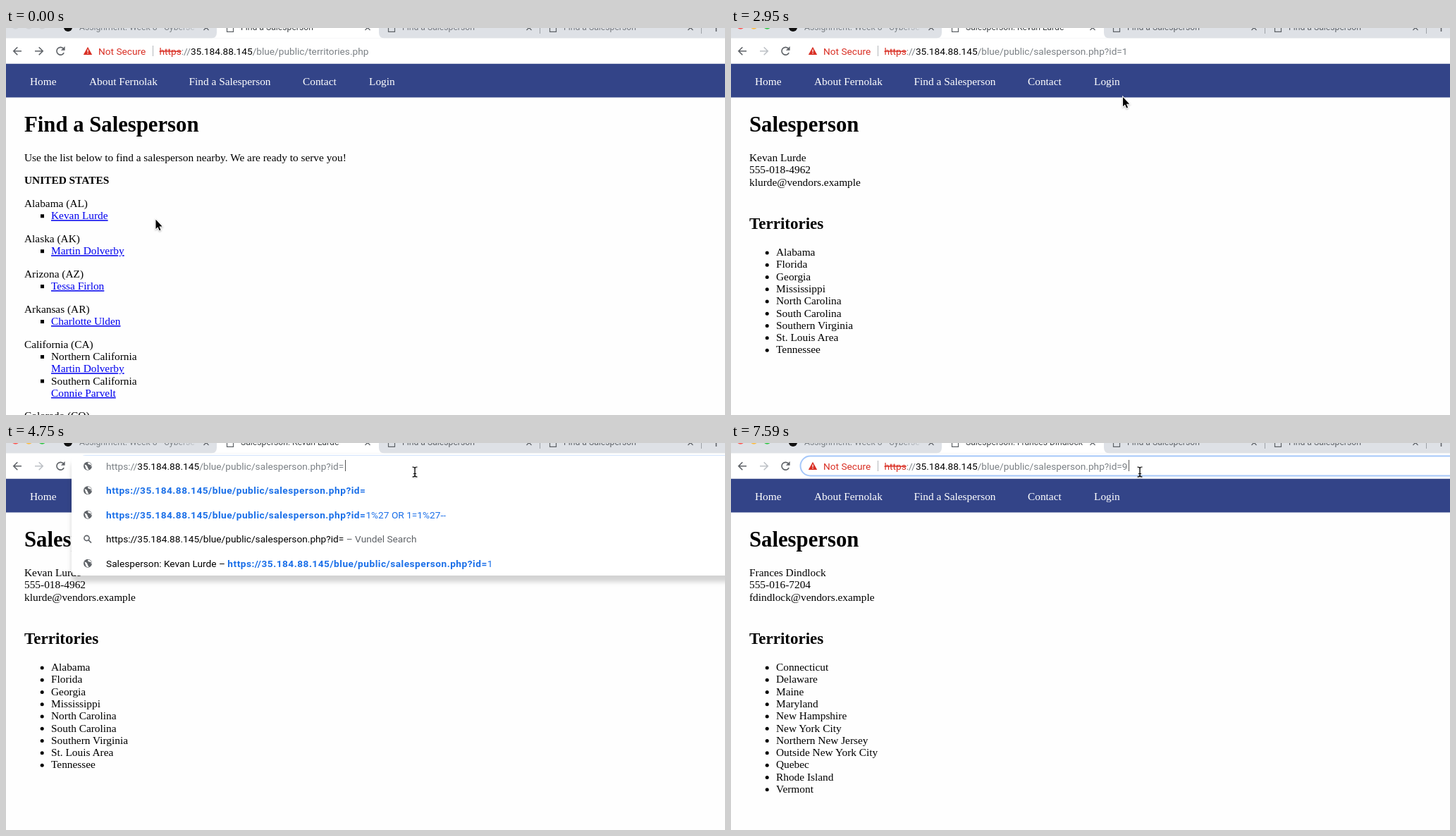
Animation of 1020 by 549 pixels, one loop 8 s. Source, as an HTML page:

```html
<!DOCTYPE html>
<html lang="en">
<head>
<meta charset="utf-8">
<title>Find a Salesperson</title>
<style>
  html, body { margin: 0; width: 100%; height: 100%; overflow: hidden; background: #fefefe; }
  svg { display: block; width: 1020px; height: 549px; }
  text { white-space: pre; }
  .page { font: 15.36px "Liberation Serif", serif; }
  .h1 { font-size: 30.72px; font-weight: bold; }
  .h2 { font-size: 23.04px; font-weight: bold; }
  .b { font-weight: bold; }
  .link { fill: #00e; text-decoration: underline; }
  .nav { fill: #fff; }
  .tab { font: 12.2px Roboto, sans-serif; }
  .url { font: 13.7px Roboto, sans-serif; }
  .hit { fill: #1a6fe8; }
  .hit .b { letter-spacing: .5px; }
  .gray { fill: #7b8085; }
  .note { fill: #5f6368; }
  .red { fill: #d93025; }
  .strike { text-decoration: line-through; }
  .line { fill: none; stroke: #5f6368; stroke-width: 1.6; }
  .panel { fill: #fff; filter: drop-shadow(0 9px 3px rgba(0, 0, 0, .17)); }
  #cursor { filter: drop-shadow(0 1px 1px rgba(0, 0, 0, .3)); }
</style>
</head>
<body>
<svg viewBox="0 0 1020 549"><g id="screen"></g><g id="cursor"></g></svg>
<script>
const LOOP = 8000, STEP = 147.6, LINE = 17.28;
const HOST = '35.184.88.145', PERSON_PATH = '/blue/public/salesperson.php?id=';

const people = {
  1: { name: 'Kevan Lurde', phone: '555-018-4962', mail: 'klurde@vendors.example',
    areas: 'Alabama,Florida,Georgia,Mississippi,North Carolina,South Carolina,Southern Virginia,St. Louis Area,Tennessee' },
  9: { name: 'Frances Dindlock', phone: '555-016-7204', mail: 'fdindlock@vendors.example',
    areas: 'Connecticut,Delaware,Maine,Maryland,New Hampshire,New York City,Northern New Jersey,Outside New York City,Quebec,Rhode Island,Vermont' }
};
const states = [
  ['Alabama (AL)', 'Kevan Lurde'], ['Alaska (AK)', 'Martin Dolverby'],
  ['Arizona (AZ)', 'Tessa Firlon'], ['Arkansas (AR)', 'Charlotte Ulden']
];

// Each entry changes part of the browser state at its time.
const timeline = [
  [0, { active: false, page: 0, id: 0, loading: false, focus: false, selected: false, caret: false, menu: 0 }],
  [885, { active: true }],
  [1765, { loading: true }],
  [2065, { page: 1, id: 1, loading: false }],
  [3240, { focus: true }],
  [3390, { selected: true }],
  [3850, { selected: false, caret: true }],
  [4300, { caret: false }],
  [4600, { menu: 4, id: '', caret: true }],
  [5040, { menu: 2, id: 9 }],
  [5490, { caret: false }],
  [5635, { menu: 0, focus: false, loading: true }],
  [5785, { page: 9, loading: false }],
  [6990, { focus: true }],
  [7140, { selected: true }],
  [7590, { selected: false, caret: true }]
];
// Pointer stops: step, x, y
const stops = [[0, 212, 271], [8, 136, 265], [10, 136, 265], [13, 166, 265], [18, 547, 117], [21, 580, 41]];

const text = (x, y, str, cls = '') => `<text x="${x}" y="${y}" class="${cls}">${str}</text>`;
const span = (cls, str) => `<tspan class="${cls}">${str}</tspan>`;
const rect = (x, y, w, h, fill, extra = '') => `<rect x="${x}" y="${y}" width="${w}" height="${h}" fill="${fill}" ${extra}/>`;
const line = (d, extra = '') => `<path class="line" d="${d}" ${extra}/>`;
const circle = (x, y, r, fill) => `<circle cx="${x}" cy="${y}" r="${r}" fill="${fill}"/>`;
const caret = x => rect(x, 24, 1, 16, '#555');

function tabs(s) {
  const lights = s.active ? ['#fc5b57', '#fdbc40', '#34c84a'] : Array(3).fill('#d0d2d6');
  const titles = [s.page ? 'Salesperson: ' + people[s.page].name : 'Find a Salesperson', 'Find a Salesperson', 'Find a Salesperson'];
  const ink = s.active ? '#5f6368' : '#777a7f';
  let out = rect(0, 0, 1020, 14.5, '#dee1e6')
    + '<path d="M291 14.5q8 0 8-8V0H529V6.5q0 8 8 8z" fill="#fff"/>'
    + lights.map((c, i) => circle(13.5 + 18.9 * i, -4, 5.8, c)).join('')
    + circle(88, -1, 6, '#111')
    + `<g class="tab">` + text(104, 3.3, 'Assignment: Week 8 - Cyberse', 'gray')
    + rect(240, 0, 36, 8, 'url(#fade)');
  titles.forEach((title, i) => {
    const x = 313 + 229 * i;
    out += i === 0 && s.loading ? circle(312, 0, 1, '#888')
      : line(`M${x + .5} -5V5.3H${x + 9.5}V-5`, 'style="stroke-width:1.2"');
    out += `<g fill="${i ? ink : '#3c4043'}">${text(x + 20, 3.3, title)}</g>`;
  });
  out += '</g>';
  for (let x = 284; x < 1000; x += 229) out += line(`M${x - 3.5} -4l7 7m0 -7l-7 7`, 'style="stroke-width:1.3"');
  return out + line('M757.5 0V8M986.5 0V8', 'style="stroke:#9da1a6;stroke-width:1"')
    + line('M1007.5 0V5');
}

function address(s) {
  const path = s.page || s.id ? PERSON_PATH + s.id : '/blue/public/territories.php';
  const forward = s.page ? 'style="stroke:#bdc1c6"' : '';
  let out = rect(0, 14, 1020, 36.5, '#fff')
    + line('M22 32.8H11M16.3 27.3L10.8 32.8L16.3 38.3')
    + line('M41 32.8H52M46.7 27.3L52.2 32.8L46.7 38.3', forward)
    + (s.loading ? line('M72.3 27.8l10 10m0 -10l-10 10')
      : line('M82.2 35.2A5.4 5.4 0 1 1 81.2 28.9') + '<path d="M83.6 26v5.7h-5.7z" fill="#5f6368"/>');
  if (s.focus) out += rect(98.5, 18.5, 960, 28, '#fff', 'rx="14" stroke="#a6c8fa" stroke-width="2"');
  if (s.selected) out += rect(217.5, 24, 345, 17, '#a9cdf8');
  const [scheme, dim] = s.selected ? ['strike', ''] : ['red strike', 'gray'];
  return out + '<path d="M116 26.8L122.2 38H109.8z" fill="#d93025"/>'
    + rect(115.4, 30.5, 1.3, 3.6, '#fff') + rect(115.4, 35, 1.3, 1.3, '#fff')
    + `<g class="url">` + text(131, 37.6, 'Not Secure', 'red') + rect(208, 25, 1, 15, '#b5b8bc')
    + text(217.5, 37.6, span(scheme, 'https') + span(dim, '://') + HOST + span(dim, path)) + '</g>'
    + (s.caret ? caret(564) : '');
}

function menu(s) {
  const base = `https://${HOST}${PERSON_PATH}`, url = base + s.id;
  const search = [url + span('note', ' – Vundel Search'), ''];
  const rows = [[span('b', url), 'hit']];
  if (s.menu === 4) rows.push([span('b', base) + '1%27 OR 1=1%27--', 'hit']);
  rows.push(search);
  if (s.menu === 4) rows.push([`Salesperson: ${people[1].name} – ` + span('hit', span('b', base) + 1), '']);
  const globe = y => circle(116, y, 6, '#5f6368')
    + `<path d="M111.5 ${y - 2}q3 0 4 3t2 4q-2 1 -4 -1zM116 ${y - 5}q0 3 3 3t1 3l2 -1q-1 -4 -4 -5z" fill="#fff"/>`;
  const bottom = s.menu === 4 ? 188 : 119;
  let out = `<path class="panel" d="M101 18H1040V${bottom}H101q-8 0 -8 -8V26q0 -8 8 -8z"/><g class="url">`
    + globe(32.8) + text(142, 37.6, span('gray', 'https://') + HOST + span('gray', PERSON_PATH + s.id));
  rows.forEach(([str, cls], i) => {
    const y = 67.2 + 34.5 * i;
    out += (rows[i] === search
      ? `<circle class="line" cx="114.5" cy="${y - 1.2}" r="3.6"/>` + line(`M117 ${y + 1.4}l4 4`) : globe(y))
      + text(142, y + 4.8, str, cls);
  });
  return out + '</g>' + (s.caret ? caret(s.id ? 489 : 481) : '');
}

function listPage() {
  const square = y => rect(49, y - 7, 5, 5, '#000');
  let y = 254, out = text(26, 147, 'Find a Salesperson', 'h1')
    + text(26, 189, 'Use the list below to find a salesperson nearby. We are ready to serve you!')
    + text(26, 221.4, 'UNITED STATES', 'b');
  for (const [state, name] of states) {
    out += text(26, y, state) + square(y + LINE) + text(64, y + LINE, name, 'link');
    y += 49.92;
  }
  out += text(26, y, 'California (CA)');
  for (const [part, name] of [['Northern', 'Martin Dolverby'], ['Southern', 'Connie Parvelt']]) {
    out += square(y + LINE) + text(64, y + LINE, part + ' California') + text(64, y + 2 * LINE, name, 'link');
    y += 2 * LINE;
  }
  return out + text(26, 554.5, 'Colorado (CO)');
}

function personPage({ name, phone, mail, areas }) {
  return text(26, 147, 'Salesperson', 'h1')
    + [name, phone, mail].map((str, i) => text(26, 189 + LINE * i, str)).join('')
    + text(26, 285, 'Territories', 'h2')
    + areas.split(',').map((area, i) => circle(51.2, 318.9 + LINE * i, 2.5, '#000') + text(64, 323.2 + LINE * i, area)).join('');
}

function screen(s) {
  const nav = [[34, 'Home'], [118, 'About Fernolak'], [259.5, 'Find a Salesperson'], [421, 'Contact'], [515, 'Login']];
  return '<linearGradient id="fade"><stop stop-color="#dee1e6" stop-opacity="0"/><stop offset="1" stop-color="#dee1e6"/></linearGradient>'
    + '<g class="page">' + rect(0, 50.5, 1020, 48, '#348')
    + nav.map(([x, str]) => text(x, 80.5, str, 'nav')).join('')
    + (s.page ? personPage(people[s.page]) : listPage()) + '</g>'
    + address(s) + (s.menu ? menu(s) : '') + tabs(s);
}

const pointers = {
  arrow: '<path d="M.5 .8V14L3.400 11.200L5.600 16.200L7.500 15.400L5.400 10.400H9.600z" stroke="#fff" stroke-width="1.8" paint-order="stroke"/>',
  beam: '<path d="M-3.5 -7Q0 -7 0 -5Q0 -7 3.5 -7M0 -5V5M-3.5 7Q0 7 0 5Q0 7 3.5 7M-2 2.5H2" fill="none" stroke="#000" stroke-width="1.2"/>',
  hand: '<path d="M-1.5 9V1q0 -1.5 1.5 -1.5T1.5 1V6q4 -1 5 1q3 -.5 3 2.5V12q0 3 -2 6H0Q-1 14 -5 10.5q0 -3 3.5 0z" fill="#fff" stroke="#000"/>'
};

function pointerAt(t) {
  const k = Math.floor(t / STEP);
  const i = stops.findIndex(p => p[0] > k);
  if (i < 0) return stops[stops.length - 1].slice(1);
  const [k0, x0, y0] = stops[i - 1], [k1, x1, y1] = stops[i];
  const u = (k - k0) / (k1 - k0), e = u * u * (3 - 2 * u);
  return [x0 + (x1 - x0) * e, y0 + (y1 - y0) * e];
}

const screenEl = document.getElementById('screen'), cursorEl = document.getElementById('cursor');
let shown = -1;
function draw(now) {
  const t = now % LOOP;
  const past = timeline.filter(([at]) => at <= t);
  if (past.length !== shown) {
    shown = past.length;
    screenEl.innerHTML = screen(Object.assign({}, ...past.map(([, change]) => change)));
  }
  const [x, y] = pointerAt(t);
  const kind = t >= 5490 && t < 5935 ? 'arrow' : y < 50 ? 'beam' : x < 144 ? 'hand' : 'arrow';
  cursorEl.innerHTML = pointers[kind];
  cursorEl.setAttribute('transform', `translate(${x} ${y})`);
  requestAnimationFrame(draw);
}
draw(0);
</script>
</body>
</html>
```
